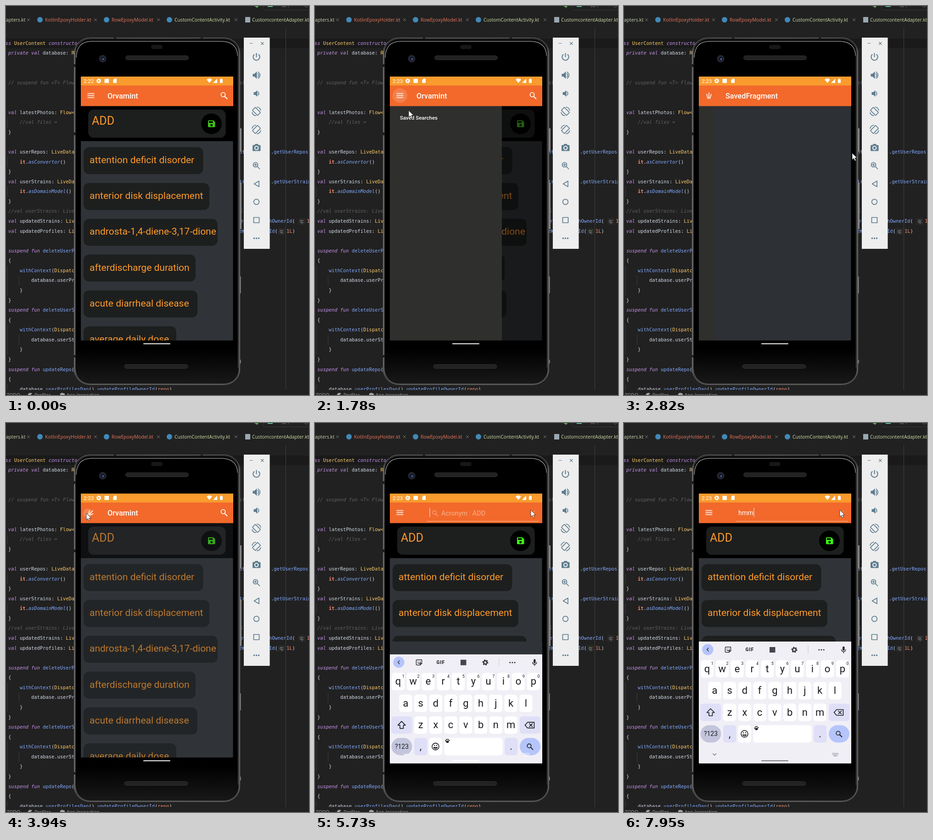
Write an HTML page that moves like this. It is 660x849 px and loops after 8000 ms.

```html
<!DOCTYPE html>
<html lang="en">
<head>
<meta charset="utf-8">
<title>Acronym search demo</title>
<style>
html, body { margin: 0; width: 100%; height: 100%; overflow: hidden; background: #212121; }
svg { display: block; width: 100vw; height: 100vh; }
text { white-space: pre; }
.code { font: 10.4px "DejaVu Sans Mono", monospace; fill: #d3dae6; }
.code .k { fill: #c792ea; font-style: italic; }
.code .f { fill: #82aaff; }
.code .i { fill: #82aaff; font-style: italic; }
.code .y { fill: #ffcb6b; }
.code .o { fill: #f78c6c; }
.code .b { fill: #f78c6c; font-weight: bold; }
.code .c { fill: #616161; font-style: italic; }
.code .h { fill: #a0a0a0; font-family: "Open Sans", sans-serif; }
.tab { font: 10.3px "Open Sans", sans-serif; }
.ui { font-family: Roboto, sans-serif; fill: #fff; }
.hand { font: 21px Roboto, sans-serif; fill: #ff9a2b; }
.key { font: 22px Roboto, sans-serif; fill: #1b1b20; text-anchor: middle; }
.line { fill: none; stroke-linecap: round; stroke-linejoin: round; }

[class*="a-"] { animation: 8s linear infinite; }
.step { animation-timing-function: step-end !important; }
.a-cursor { animation-name: cursor; }
.a-before { animation-name: before; }
.a-after { animation-name: after; }
.a-home { animation-name: home; }
.a-saved { animation-name: saved; }
.a-field { animation-name: field; }
.a-hint { animation-name: hint; }
.a-type1 { animation-name: type1; }
.a-type2 { animation-name: type2; }
.a-type3 { animation-name: type3; }
.a-caret { animation-name: caret; }
.a-list { animation-name: list; }
.a-drawer { animation-name: drawer; }
.a-scrim { animation-name: scrim; }
.a-press { animation-name: press; opacity: 0; }
.a-back { animation-name: back; opacity: 0; }
.a-board { animation-name: board; }
.a-resize { animation-name: resize; }
.a-nav { animation-name: nav; }
.a-pill { animation-name: pill; }
.a-save { animation-name: save; }
.a-spin { animation-name: spin; }
.a-mid { animation-name: mid; }
.a-top { animation-name: top; }
.a-bot { animation-name: bot; }

@keyframes cursor {
  0%, .87% { transform: translate(600px, 870px); }
  .875% { transform: translate(582px, 821px); animation-timing-function: cubic-bezier(.3, .2, .4, 1); }
  9.5%, 12% { transform: translate(191px, 216px); }
  14.5%, 20% { transform: translate(188px, 201px); }
  22.25% { transform: translate(204px, 228px); }
  27.5%, 31% { transform: translate(214px, 240px); animation-timing-function: ease-in-out; }
  35.25%, 36% { transform: translate(497px, 321px); }
  37.9% { transform: translate(358px, 408px); animation-timing-function: ease-out; }
  43.25%, 56.25% { transform: translate(175px, 197px); }
  58% { transform: translate(260px, 235px); }
  59.75% { transform: translate(400px, 247px); }
  61.25% { transform: translate(489px, 215px); }
  63.1%, 100% { transform: translate(470px, 190px); }
}
@keyframes before { 0% { opacity: 1; } 17.875%, 100% { opacity: 0; } }
@keyframes after { 0% { opacity: 0; } 17.875%, 100% { opacity: 1; } }
@keyframes home { 0%, 47.25% { opacity: 1; } 33.25%, 64.875%, 100% { opacity: 0; } }
@keyframes saved { 0%, 47.25%, 100% { opacity: 0; } 33.25% { opacity: 1; } }
@keyframes field { 0% { opacity: 0; } 64.875%, 100% { opacity: 1; } }
@keyframes hint { 0% { opacity: 1; } 82.25%, 100% { opacity: 0; } }
@keyframes type1 { 0% { visibility: hidden; } 82.25%, 100% { visibility: visible; } }
@keyframes type2 { 0% { visibility: hidden; } 84.875%, 100% { visibility: visible; } }
@keyframes type3 { 0% { visibility: hidden; } 86.625%, 100% { visibility: visible; } }
@keyframes caret {
  0% { opacity: 1; transform: none; }
  75.25% { opacity: 0; transform: none; }
  81.5% { opacity: 1; transform: none; }
  82.25% { opacity: 1; transform: translateX(8px); }
  84.875% { opacity: 1; transform: translateX(20.5px); }
  86.625% { opacity: 1; transform: translateX(33px); }
  93.5% { opacity: 0; transform: translateX(33px); }
  99.375%, 100% { opacity: 1; transform: translateX(33px); }
}
@keyframes list { 0%, 33.25%, 50.2%, 100% { opacity: 1; } 35.2%, 47.25% { opacity: 0; } }
@keyframes drawer {
  0%, 17.875% { transform: translateX(-244px); animation-timing-function: cubic-bezier(.22, 1, .36, 1); }
  22%, 33.25% { transform: none; animation-timing-function: cubic-bezier(.22, 1, .36, 1); }
  39.5%, 100% { transform: translateX(-244px); }
}
@keyframes scrim {
  0%, 17.875% { opacity: 0; animation-timing-function: cubic-bezier(.22, 1, .36, 1); }
  22%, 33.25% { opacity: .5; animation-timing-function: cubic-bezier(.22, 1, .36, 1); }
  39.5%, 100% { opacity: 0; }
}
@keyframes press { 0%, 17.875%, 26%, 100% { opacity: 0; } 19%, 23% { opacity: .15; } }
@keyframes back {
  0%, 47.2% { opacity: 0; transform: scale(.2); }
  48%, 50% { opacity: .18; }
  51% { transform: scale(1); }
  54%, 100% { opacity: 0; transform: scale(1); }
}
@keyframes board {
  0%, 69.5% { transform: translateY(266px); animation-timing-function: cubic-bezier(.215, .61, .355, 1); }
  73.5%, 100% { transform: none; }
}
@keyframes resize { 0% { opacity: 0; } 69.5%, 100% { opacity: 1; } }
@keyframes nav { 0%, 77.8% { color: #fff; } 93.5%, 100% { color: #77757d; } }
@keyframes pill { 0%, 69.4% { fill: #dedede; } 70%, 77.8% { fill: #fff; } 92%, 100% { fill: #85838a; } }
@keyframes save { 0%, 47.25% { fill: #43bd1a; } 50.2%, 100% { fill: #39f70c; } }
@keyframes spin {
  0%, 33.4% { transform: rotate(-180deg); animation-timing-function: ease-in-out; }
  37.1%, 48% { transform: none; animation-timing-function: ease-in-out; }
  51.6%, 100% { transform: rotate(-180deg); }
}
@keyframes mid {
  0%, 33.4% { d: path("M-7.5 0L7.5 0"); animation-timing-function: ease-in-out; }
  37.1%, 48% { d: path("M-6 0L6 0"); animation-timing-function: ease-in-out; }
  51.6%, 100% { d: path("M-7.5 0L7.5 0"); }
}
@keyframes top {
  0%, 33.4% { d: path("M-7.5 -4.4L7.5 -4.4"); animation-timing-function: ease-in-out; }
  37.1%, 48% { d: path("M-6.6 .6L0 -6"); animation-timing-function: ease-in-out; }
  51.6%, 100% { d: path("M-7.5 -4.4L7.5 -4.4"); }
}
@keyframes bot {
  0%, 33.4% { d: path("M-7.5 4.4L7.5 4.4"); animation-timing-function: ease-in-out; }
  37.1%, 48% { d: path("M-6.6 -.6L0 6"); animation-timing-function: ease-in-out; }
  51.6%, 100% { d: path("M-7.5 4.4L7.5 4.4"); }
}
</style>
</head>
<body>
<svg viewBox="0 0 660 849" preserveAspectRatio="none">
  <defs>
    <clipPath id="screen"><path d="M163 154H494.5V743H163Z"/></clipPath>
    <clipPath id="page"><path d="M163 218H495V730H163Z"/></clipPath>
    <clipPath id="editor"><path d="M0 48H660V838H0Z"/></clipPath>
    <linearGradient id="edge"><stop offset="0" stop-color="#777"/><stop offset=".012" stop-color="#2a2a2a"/><stop offset=".5" stop-color="#333"/><stop offset=".988" stop-color="#242424"/><stop offset="1" stop-color="#6a6a6a"/></linearGradient>
    <linearGradient id="chin" x2="0" y2="1"><stop offset=".9" stop-color="#000"/><stop offset="1" stop-color="#181818"/></linearGradient>
  </defs>

  <!-- editor -->
  <rect width="660" height="849" fill="#212121"/>
  <rect y="71" width="660" height="21" fill="#1a1a1a"/>
  <g clip-path="url(#editor)">
    <path d="M3.5 244V265M3.5 330V351M3.5 394V416M3.5 566V632M28.5 589V610M3.5 695V761M28.5 718V740M3.5 825V838" stroke="#3b3b3b"/>
    <path d="M609.5 48V838" stroke="#414141"/>
    <g id="code" class="code"></g>
  </g>
  <g id="tabs" class="tab"></g>
  <path d="M541 0l6 4 3-3-1-1z" fill="#57a64a"/>
  <path d="M560.5 0V5Q560.5 8.5 564 8.5H660" fill="none" stroke="#383838"/>
  <path d="M570 0h11v2h-11z" fill="#57b98a"/>
  <text class="tab" x="601" y="3" fill="#777">APP</text>
  <path d="M650 0l4 3 4-3" fill="none" stroke="#666"/>
  <g class="tab" fill="#a3a3a3">
    <text x="2" y="853">TODO</text><text x="62" y="853">Profiler</text><text x="132" y="853">App Inspection</text>
    <path d="M48 849a5 4 0 0 1 9-3l-4 3zM118 849v-3l4-2 6 2v3z"/>
  </g>

  <!-- phone -->
  <path d="M510 267h3v51h-3zM510 385h3v102h-3zM510 590h1.5v37h-1.5zM510 772h1.5v8h-1.5z" fill="#858585"/>
  <rect x="148.5" y="69.5" width="361" height="757" rx="34" fill="url(#edge)" stroke="#6e6e6e"/>
  <rect x="152" y="73" width="354" height="750" rx="31" fill="url(#chin)" stroke="#111"/>
  <path class="line" d="M153 112Q154 77.500 186 77H470Q503 78 504.500 108" stroke="#8c8c8c" stroke-width="1.500"/>
  <path d="M505.500 108V790" stroke="#4a4a4a"/>
  <path d="M148 127h4v6h-4zM148 276h4v6h-4zM148 762h4v5h-4zM235 69h5v4h-5zM424 69h5v4h-5z" fill="#1b1b1b"/>
  <path class="line" d="M150 787Q152 825 186 825H472Q508 825 509 787" stroke="#555" stroke-width="1.500"/>
  <rect x="316" y="85" width="25" height="9" rx="4.5" fill="#171717"/>
  <rect x="260.5" y="108.5" width="137" height="9" rx="4.5" fill="#222" stroke="#303030"/>
  <rect x="258" y="782.5" width="138" height="8.5" rx="4.2" fill="#222" stroke="#303030"/>
  <circle cx="210.5" cy="115" r="7.5" fill="#20242c" stroke="#2f3238"/>
  <circle cx="210.5" cy="115" r="3.8" fill="#101a3a"/>
  <circle cx="211.5" cy="116" r="1.3" fill="#8fa4d8"/>

  <!-- screen -->
  <g clip-path="url(#screen)">
    <path d="M163 153H495V743H163Z"/>
    <g clip-path="url(#page)">
      <path d="M163 218H495V730H163Z" fill="#303438"/>
      <g class="a-list">
        <path d="M163 218H495V295H163Z"/>
        <rect x="179" y="226" width="299.5" height="61.5" rx="12" fill="#1d1e1e"/>
        <text class="hand" x="187" y="259" style="font-size:25px">ADD</text>
        <circle cx="447.5" cy="257" r="22.5"/>
        <path class="a-save" fill-rule="evenodd" d="M442 249.5H451.5L455.5 253.5V263Q455.5 264.5 454 264.5H442Q440 264.5 440 263V251.5Q440 249.5 442 249.5ZM442 251.5V255H450.5V251.5ZM447.7 257.5a2.5 2.5 0 1 0 .01 0z"/>
        <g id="cards"></g>
      </g>
      <rect class="a-resize step" x="163" y="477" width="332" height="253" fill="#303438"/>
      <rect class="a-scrim" x="163" y="218" width="332" height="512"/>
      <g class="a-drawer">
        <rect x="163" y="218" width="244" height="512" fill="#2f2f2e"/>
        <text class="ui" x="185" y="248" font-size="11.5" font-weight="500">Saved Searches</text>
      </g>
    </g>

    <!-- app bar -->
    <path d="M163 173H495V218.6H163Z" fill="#f2692b"/>
    <path d="M163 153H495V173.4H163Z" fill="#f99b2d"/>
    <g class="ui" font-size="11.6">
      <text x="169" y="167.5">2:2</text>
      <text class="a-before step" x="184.7" y="167.5">2</text>
      <text class="a-after step" x="184.7" y="167.5">3</text>
    </g>
    <g fill="#fff">
      <circle cx="202" cy="163.5" r="3" fill="none" stroke="#fff" stroke-width="2.4"/>
      <circle cx="202" cy="163.5" r="4.7" fill="none" stroke="#fff" stroke-width="1.5" stroke-dasharray="2.46 2.46"/>
      <rect x="214.5" y="159" width="9.5" height="9"/>
      <path d="M236.5 158.5H241V168H233.5V161.5Z"/>
      <path d="M437 160.5Q443 155.5 449 160.5L443 168Z"/>
      <path d="M451 168L460 158.5V168Z"/>
      <path d="M466 160H467.5V158.5H470.5V160H472V168H466Z"/>
    </g>
    <circle class="a-press" cx="185" cy="195.5" r="16" fill="#fff"/>
    <g transform="translate(178 197)"><circle class="a-back" r="16" fill="#fff"/></g>
    <g transform="translate(185 195.5)">
      <g class="a-spin" fill="none" stroke="#fff" stroke-width="1.6">
        <path class="a-mid" d="M-7.5 0L7.5 0"/><path class="a-top" d="M-7.5 -4.4L7.5 -4.4"/><path class="a-bot" d="M-7.5 4.4L7.5 4.4"/>
      </g>
    </g>
    <g class="a-home step">
      <text class="ui" x="221" y="202" font-size="16.3" font-weight="500">Orvamint</text>
      <path d="M476.2 197.2L482 203" stroke="#fff" stroke-width="2"/>
      <circle cx="473" cy="193.5" r="4.6" fill="none" stroke="#fff" stroke-width="1.7"/>
    </g>
    <text class="ui a-saved step" x="221" y="202" font-size="16.3" font-weight="500">SavedFragment</text>
    <g class="a-field step">
      <path d="M243 214.5H488" stroke="#f9b795"/>
      <path d="M470.5 191L479.5 200M479.5 191L470.5 200" stroke="#f58a58" stroke-width="1.3"/>
      <g class="a-hint step">
        <circle cx="260" cy="195.5" r="4" fill="none" stroke="#f8a780" stroke-width="1.4"/>
        <path d="M263 198.5L268 203.5" stroke="#f8a780" stroke-width="1.6"/>
        <text class="ui" x="275" y="202" font-size="14.4" style="fill:#f9b28f">Acronym : ADD</text>
      </g>
      <text class="ui" x="249" y="201" font-size="14.4"><tspan class="a-type1 step">h</tspan><tspan class="a-type2 step">m</tspan><tspan class="a-type3 step">m</tspan></text>
      <rect class="a-caret step" x="249.3" y="185" width="1.5" height="20" fill="#e6c9ba"/>
    </g>

    <!-- keyboard -->
    <g class="a-board">
      <rect x="163" y="477" width="332" height="300" fill="#f1eff6"/>
      <circle cx="182.5" cy="494.5" r="12.2" fill="#b5c5fc"/>
      <g class="line" stroke="#303138" stroke-width="1.5">
        <path d="M184 491L180.5 494.5L184 498"/>
        <path d="M222 489H232.5V497L229 500.5H222Q220.5 500.5 220.5 499V490.5Q220.5 489 222 489ZM233 497H229V500.5M224 495.5Q227 498.5 230 495M224.5 492.5V493M229 492.5V493"/>
        <circle cx="371" cy="495" r="3.6" stroke-width="2.4"/>
        <circle cx="371" cy="495" r="5.5" stroke-width="2" stroke-dasharray="1.5 4.26"/>
        <path d="M473.8 494.5Q474 499 478.3 499.2Q482.5 499 482.8 494.5M478.3 499.5V502"/>
      </g>
      <rect x="476" y="487.5" width="4.6" height="9.5" rx="2.3" fill="#303138"/>
      <text x="264.5" y="498.3" font-family="Roboto, sans-serif" font-weight="900" font-size="10.5" letter-spacing=".8" fill="#303138">GIF</text>
      <rect x="317" y="489" width="12.5" height="12" fill="#44464f"/>
      <path d="M401 486V503" stroke="#c9c8d0"/>
      <g fill="#303138"><circle cx="424.8" cy="495" r="1.5"/><circle cx="430" cy="495" r="1.5"/><circle cx="435.2" cy="495" r="1.5"/></g>
      <g id="keys"></g>
      <g class="line" stroke="#1b1b20" stroke-width="1.6">
        <path d="M188.5 623.5L180.5 632H185V639H192.5V632H197Z"/>
        <path d="M463 625.5H477.5V638H463L457.5 631.7ZM467 628.5L473.5 635M473.5 628.5L467 635"/>
        <circle cx="262.5" cy="678.5" r="7.5"/><path d="M258.5 680.5Q262.5 686 266.5 680.5Z"/>
        <circle cx="466.5" cy="677" r="4.3"/><path d="M470 680.5L474.5 685" stroke-width="2"/>
      </g>
      <g fill="#1b1b20">
        <circle cx="260" cy="676" r="1.2"/><circle cx="265" cy="676" r="1.2"/>
        <ellipse cx="288.5" cy="668" rx="3" ry="2.4"/><circle cx="284.5" cy="666" r="1.3"/><circle cx="286.3" cy="663.2" r="1.3"/><circle cx="289.5" cy="662.6" r="1.3"/><circle cx="292" cy="665" r="1.3"/>
      </g>
    </g>
    <g class="a-resize step">
      <g class="a-nav">
        <path class="line" d="M193.8 721.8L197.3 725.3L200.8 721.8" stroke="currentColor" stroke-width="1.4"/>
        <path d="M454 721H467M454 723.5H467" stroke="currentColor" stroke-width="1.5" stroke-dasharray="1.5 1.3"/>
        <path d="M456.5 726.5H464.5" stroke="currentColor" stroke-width="1.3"/>
      </g>
    </g>
    <rect class="a-pill" x="299" y="736" width="59" height="2.3" rx="1.1"/>
  </g>

  <!-- emulator panel -->
  <rect x="518" y="69" width="56.5" height="461" fill="#eee"/>
  <g class="line" stroke="#5d7c8e" stroke-width="1.7">
    <path d="M531 81.5H537M555.5 79L561 84.5M561 79L555.5 84.5" stroke-width="1.1"/>
    <path d="M545.5 103.5V111M540.5 106A7.2 7.2 0 1 0 550.5 106" stroke-width="2"/>
    <path d="M549 147.5Q551.5 151 549 154.5M549.5 144Q557 151 549.5 158"/>
    <path d="M549.5 187.5Q552 191 549.5 194.5"/>
    <g id="turn" transform="translate(545.5 230)">
      <rect x="-4.6" y="-8" width="9.2" height="16" rx="1.2" transform="rotate(-45)"/>
      <path d="M1.5 -9.5Q8 -8.5 9.3 -2.5M-1.5 9.5Q-8 8.5 -9.3 2.5"/>
    </g>
    <use href="#turn" transform="matrix(-1 0 0 1 1091 39.5)"/>
    <circle cx="543.5" cy="346.5" r="5"/><path d="M547.5 350.5L552.5 355.5M541 346.5H546M543.5 344V349"/>
    <path d="M551 382V394.5L540.5 388.2Z"/>
    <circle cx="545.5" cy="427.5" r="5.8"/>
    <path d="M539.5 461.5H551.5V473H539.5Z"/>
  </g>
  <g fill="#5d7c8e">
    <path d="M537.5 148H541L546.5 143V159L541 154H537.5ZM539.5 188H543L547.5 184V198L543 194H539.5Z"/>
    <path fill-rule="evenodd" d="M538 303.5H541.5L543 301H548.5L550 303.5H553Q554.5 303.5 554.5 305V315Q554.5 316.5 553 316.5H538.5Q537 316.5 537 315V305ZM545.7 305a4.8 4.8 0 1 0 .01 0zM545.7 307a2.8 2.8 0 1 1-.01 0z"/>
    <circle cx="540.5" cy="507" r="1.8"/><circle cx="545.5" cy="507" r="1.8"/><circle cx="550.5" cy="507" r="1.8"/>
  </g>

  <path class="a-cursor" d="M0 0V14.5L3.4 11.5L6 17L8.3 16L5.9 10.6H10.5Z" fill="#fff" stroke="#222" stroke-width=".8"/>
</svg>
<script>
const put = (id, html) => { document.getElementById(id).innerHTML = html; };
const esc = s => s.replace(/</g, '&lt;');

// Each run of code is "style:text", runs are parted by "~".
const runs = s => s.split('~').map(r => `<tspan class="${r[0]}">${esc(r.slice(2))}</tspan>`).join('');
const colX = col => -20 + col * 6.26;
const code = (row, x, s) => `<text x="${x}" y="${84.7 + row * 21.57}">${runs(s)}</text>`;
const fn = name => `k:suspend fun ~f:${name}`;

const rows = [
  [0, 0, 'k:class ~y:UserContent ~k:constructor'],
  [1, 4, 'k:private val ~w:database: ~y:RoomDb'],
  [4, 4, 'c:// suspend fun <T> Flow<T>'],
  [7, 4, 'k:val ~w:latestPhotos: ~y:Flow<'],
  [8, 8, 'c://val files ='],
  [9, 4, 'w:}'],
  [11, 4, 'k:val ~w:userRepos: ~y:LiveData'],
  [12, 8, 'b:it~w:.~i:asConvertor~w:()'],
  [13, 4, 'w:}'],
  [14, 4, 'k:val ~w:userStrains: ~y:LiveData'],
  [15, 8, 'b:it~w:.~i:asDomainModel~w:()'],
  [16, 4, 'w:}'],
  [17, 4, 'c://val userStrains: LiveData'],
  [18, 4, 'k:val ~w:updatedStrains: ~y:LiveData'],
  [19, 4, 'k:val ~w:updatedProfiles: ~y:LiveData'],
  [21, 4, fn('deleteUserProfile')],
  [22, 4, 'w:{'],
  [23, 8, 'f:withContext~w:(~y:Dispatchers'],
  [24, 12, 'w:database.userProfiles'],
  [25, 8, 'w:}'],
  [26, 4, 'w:}'],
  [27, 4, fn('deleteUserStrain')],
  [28, 4, 'w:{'],
  [29, 8, 'f:withContext~w:(~y:Dispatchers'],
  [30, 12, 'w:database.userStrains'],
  [31, 8, 'w:}'],
  [32, 4, 'w:}'],
  [33, 4, fn('updateRepo') + '~w:('],
  [34, 4, 'w:{'],
  [35, 8, 'w:database.~f:userProfilesDao~w:().~f:updateProfileOwnerId~w:(~o:repo~w:)']
];
const ends = [
  [4, 508, 'c:st'],
  [11, 508, 'f:ot'], [11, 577, 'w:.~f:getUserRepos'],
  [14, 508, 'f:tr'], [14, 577, 'w:.~f:getUserStrains'],
  [17, 509, 'c:S'],
  [18, 510, 'f:et'], [18, 567, 'f:thOwnerId~w:('], [18, 640, 'h:q:'], [18, 655, 'o:1L~w:)'],
  [19, 508, 'f:eW'], [19, 573, 'f:Id~w:('], [19, 596, 'h:q:'], [19, 611, 'o:1L~w:)']
];
put('code',
  '<path d="M637 463h15v14h-15zM593 485h15v14h-15z" fill="#292929"/>' +
  rows.map(([r, c, s]) => code(r, colX(c), s)).join('') +
  ends.map(([r, x, s]) => code(r, x, s)).join(''));

const tabs = [
  [0, 'apters.kt', '#c6d3b0', 49],
  [85, 'KotlinEpoxyHolder.kt', '#e8775c', 195],
  [230, 'RowEpoxyModel.kt', '#e8775c', 332],
  [367, 'CustomContentActivity.kt', '#cfe0a8', 501],
  [536, 'CustomcontentAdapter.kt', '#cfe0a8', 700]
];
put('tabs', tabs.map(([x, name, fill, shut], i) =>
  `<text x="${x}" y="34" fill="${fill}">${name}</text>` +
  `<path d="M${shut - 3} 27l6 6m0-6l-6 6" stroke="#777"/>` +
  (i === 4 ? '<rect x="521" y="24" width="11" height="12" fill="#9aa7b0"/>'
    : i ? `<circle cx="${x - 11}" cy="30" r="6" fill="#4189b8"/>` : '')).join(''));

const cards = [
  ['attention deficit disorder', 260.5], ['anterior disk displacement', 274],
  ['androsta-1,4-diene-3,17-dione', 292], ['afterdischarge duration', 244],
  ['acute diarrheal disease', 248], ['average daily dose', 202]
];
put('cards', cards.map(([label, w], i) => {
  const y = 308 + i * 78.2;
  return `<rect x="169" y="${y}" width="${w}" height="59" rx="12" fill="#1d1f1f"/>` +
    `<text class="hand" x="182" y="${y + 35}">${label}</text>`;
}).join(''));

const key = (x, y, w, fill, label = '', r = 6, size = 22) =>
  `<rect x="${x}" y="${y}" width="${w}" height="38" rx="${r}" fill="${fill}"/>` +
  `<text class="key" x="${x + w / 2}" y="${y + 19 + size * .33}" style="font-size:${size}px">${label}</text>`;
const letters = (s, x, y) => [...s].map((c, i) => key(x + i * 32.75, y, 28.2, '#fff', c)).join('');
const pale = '#dfe0f7', blue = '#b5c5fc';
put('keys',
  letters('qwertyuiop', 167, 517.5) + letters('asdfghjkl', 183.3, 565) + letters('zxcvbnm', 216, 612.5) +
  [...'1234567890'].map((c, i) => `<text class="key" x="${192.3 + i * 32.75}" y="528" style="font-size:9px">${c}</text>`).join('') +
  key(166.5, 612.5, 45, pale) + key(446, 612.5, 45, pale) +
  key(166.5, 659.5, 45, '#c3c5dc', '?123', 19, 14) + key(216, 659.5, 28.5, pale, ',') +
  key(248.5, 659.5, 28.5, '#fff') + key(281.5, 659.5, 127, '#fff') +
  key(413, 659.5, 28.5, pale, '.') + key(446, 659.5, 45, blue, '', 19));
</script>
</body>
</html>
```
